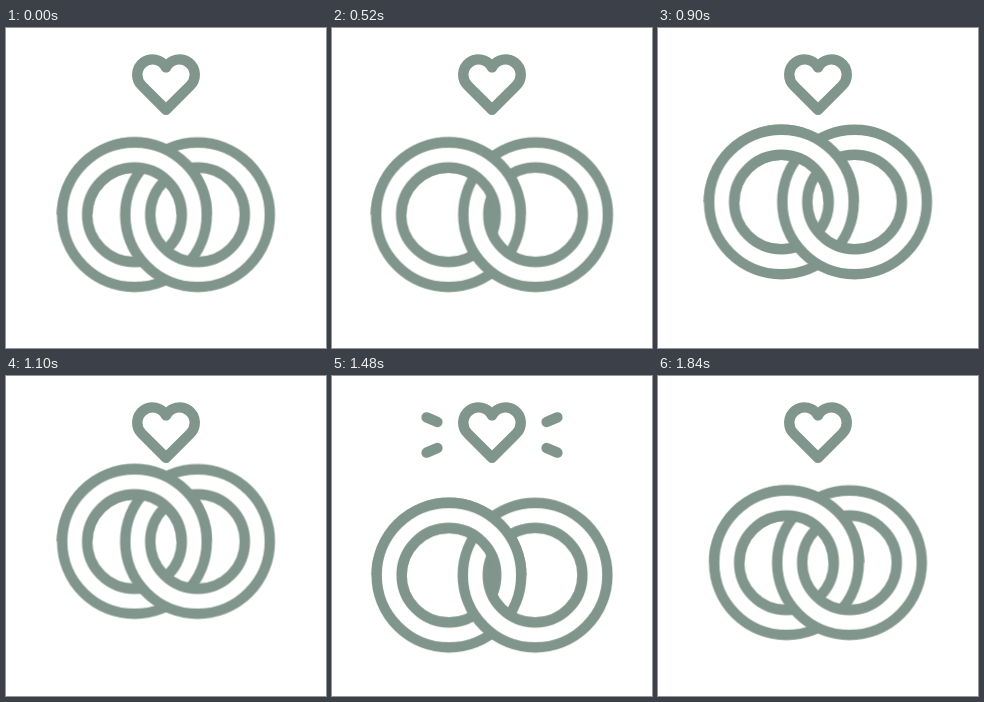
Write an HTML page without scripts that moves like this. It is 320x320 px and loops after 2.48 s.

```html
<!DOCTYPE html>
<html lang="en">
<head>
<meta charset="utf-8">
<title>Wedding rings</title>
<style>
  html, body { margin: 0; width: 100%; height: 100%; overflow: hidden; background: #fff; }
  svg { display: block; width: 100vw; height: 100vh; }

  .line { fill: none; stroke: #80958b; stroke-width: 10.4; stroke-linecap: round; stroke-linejoin: round; }
  .band { fill: none; stroke: #fff; stroke-width: 25; }

  .rings, .left, .right, .heart, .ray {
    animation: 2480ms cubic-bezier(.333, 0, .667, 1) infinite both;
  }
  .rings { animation-name: lift; }
  .left  { --side: -1; animation-name: spread; }
  .right { --side: 1; animation-name: spread; }
  .heart { animation-name: hop; }
  .ray   { animation-name: burst; animation-timing-function: linear; }

  @keyframes lift {
    0%, 25.806% { transform: translate(160px, 186.7px); }
    44.355% { transform: translate(160px, 165.5px); }
    56.452% { transform: translate(160px, 200.4px); }
    74.194%, 100% { transform: translate(160px, 186.7px); }
  }
  @keyframes spread {
    0%, 44.355%, 74.194%, 100% { transform: translateX(calc(var(--side) * 31.5px)); }
    24.194%, 25.806%, 56.452% { transform: translateX(calc(var(--side) * 44.2px)); }
  }
  @keyframes hop {
    0%, 44.355% { transform: translateY(0); }
    50% { transform: translateY(12.3px); }
    55.645% { transform: translateY(-7px); }
    59.677%, 100% { transform: translateY(0); }
  }
  /* a dash runs outward along each ray */
  @keyframes burst {
    0%, 56.04% { stroke-opacity: 0; stroke-dasharray: 1 200; stroke-dashoffset: 0; }
    56.05% { stroke-opacity: 1; stroke-dasharray: 1 200; stroke-dashoffset: 0; }
    59.677% { stroke-dasharray: 11.8 200; stroke-dashoffset: -7; stroke-width: 10.4; }
    64.5% { stroke-dasharray: 10 200; stroke-dashoffset: -23; stroke-width: 10.4; }
    68.14% { stroke-opacity: 1; stroke-dasharray: 1 200; stroke-dashoffset: -33.5; stroke-width: 3; }
    68.15%, 100% { stroke-opacity: 0; stroke-dasharray: 1 200; stroke-dashoffset: -33.5; stroke-width: 3; }
  }
</style>
</head>
<body>
<svg viewBox="0 0 320 320" role="img" aria-label="Two linked rings below a heart">
  <defs>
    <g id="ring">
      <circle class="band" r="59.8"/>
      <circle class="line" r="72.3"/>
      <circle class="line" r="47.3"/>
    </g>
    <clipPath id="upper"><rect x="-160" y="-100" width="320" height="100"/></clipPath>
  </defs>

  <g class="rings">
    <g class="left"><use href="#ring"/></g>
    <g class="right"><use href="#ring"/></g>
    <!-- the left ring passes over at the top crossing -->
    <g clip-path="url(#upper)">
      <g class="left"><use href="#ring"/></g>
    </g>
  </g>

  <path class="line ray" d="M112 48.8L80 35.2"/>
  <path class="line ray" d="M112 69.2L80 82.8"/>
  <path class="line ray" d="M208 48.8L240 35.2"/>
  <path class="line ray" d="M208 69.2L240 82.8"/>

  <path class="line heart" d="M160 81.8L135.8 57.6A15.3 15.3 0 1 1 160 39.4A15.3 15.3 0 1 1 184.2 57.6Z"/>
</svg>
</body>
</html>
```
